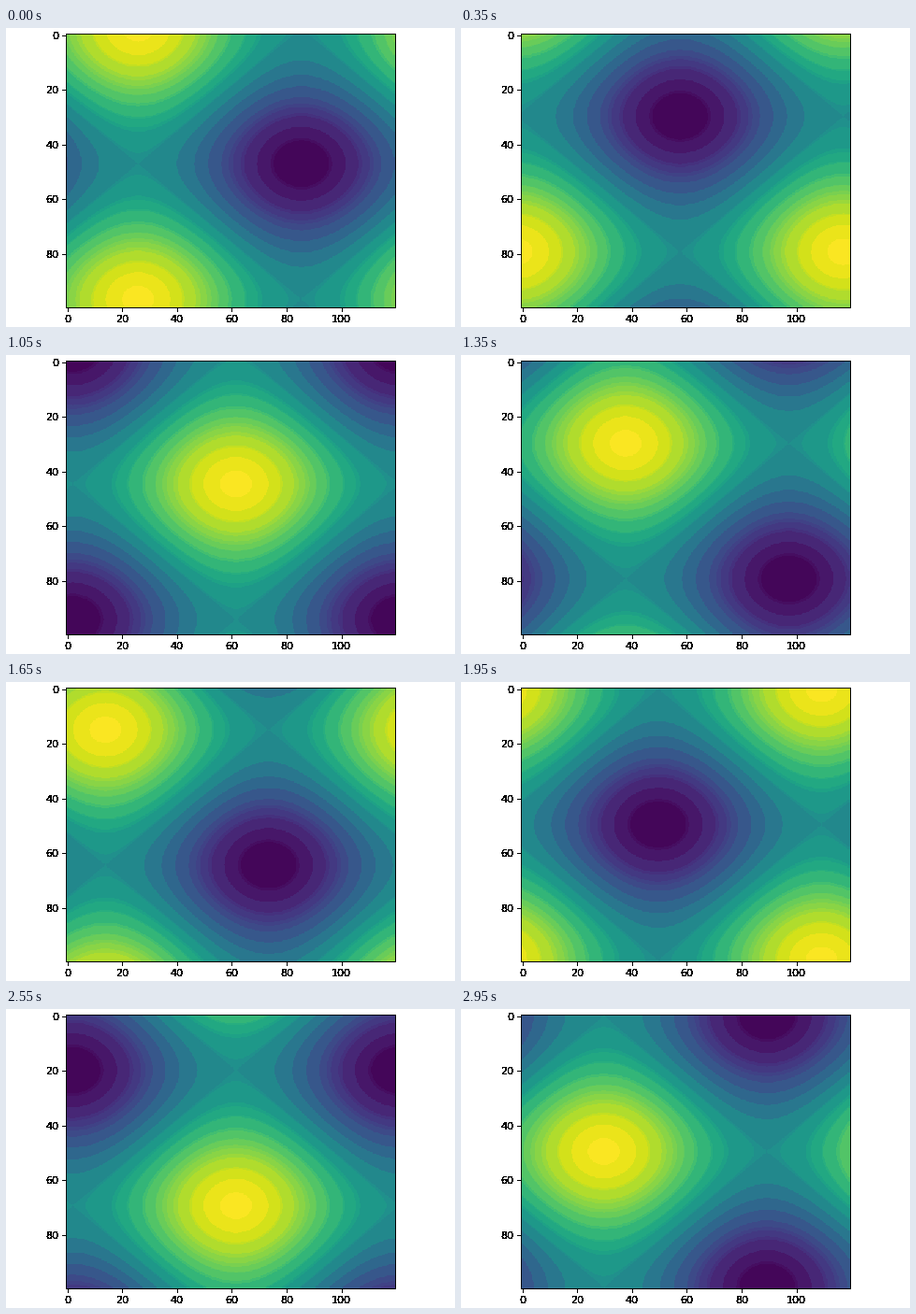
Write a matplotlib script that moves like this. It is 480 px wide and 320 px high and loops after 3000 ms.

```python
import numpy as np
import matplotlib as mpl
import matplotlib.pyplot as plt
from matplotlib.animation import FuncAnimation
from matplotlib.colors import ListedColormap

W, H, DPI = 480, 320, 80
FRAMES, INTERVAL = 60, 50
NX, NY = 120, 100
LEFT, TOP, WIDTH = 64.4, 6.2, 351.2
HEIGHT = WIDTH * NY / NX

x = np.linspace(0, 2 * np.pi, NX)
y = np.linspace(0, 2 * np.pi, NY).reshape(-1, 1)


def wave(step):
    return np.sin(x + step * np.pi / 15) + np.cos(y + step * np.pi / 20)


def banded_viridis():
    """Viridis reduced to 3-4-3 bits per channel, each band in its mean colour."""
    rgb = (mpl.colormaps["viridis"](np.arange(256))[:, :3] * 255).astype(int)
    level = np.clip((wave(0) + 2) * 64, 0, 255).astype(int)
    weight = np.bincount(level.ravel(), minlength=256) + 1
    cells = rgb // [32, 16, 32]
    bands = np.empty((256, 3))
    for cell in np.unique(cells, axis=0):
        same = (cells == cell).all(axis=1)
        bands[same] = np.average(rgb[same], axis=0, weights=weight[same])
    return ListedColormap((np.floor(bands) + 0.5) / 255)


def hard_ink(fig):
    """Everything drawn so far as solid black without soft edges."""
    fig.canvas.draw()
    alpha = np.asarray(fig.canvas.buffer_rgba())[..., 3]
    ink = np.zeros(alpha.shape + (4,), np.uint8)
    ink[..., 3] = np.where(alpha >= 32, 255, 0)
    return ink


plt.rcParams.update({"font.family": "DejaVu Sans", "font.size": 10})
fig = plt.figure(figsize=(W / DPI, H / DPI), dpi=DPI, facecolor="none")
rect = [LEFT / W, 1 - (TOP + HEIGHT) / H, WIDTH / W, HEIGHT / H]

frame = fig.add_axes(rect, facecolor="none", zorder=1)
frame.set(xlim=(-0.5, NX - 0.5), ylim=(NY - 0.5, -0.5),
          xticks=range(0, NX, 20), yticks=range(0, NY, 20))

# Solid ink below the soft frame makes ticks and labels hard-edged.
fig.figimage(hard_ink(fig), origin="upper", zorder=-1)
fig.set_facecolor("white")

ax = fig.add_axes(rect)
ax.set_axis_off()
im = ax.imshow(wave(1), cmap=banded_viridis(), interpolation="hanning",
               aspect="auto")


def update(i):
    im.set_data(wave(i + 1))
    im.autoscale()
    return [im]


anim = FuncAnimation(fig, update, frames=FRAMES, interval=INTERVAL,
                     repeat=True, repeat_delay=0, blit=False)
plt.show()
```
